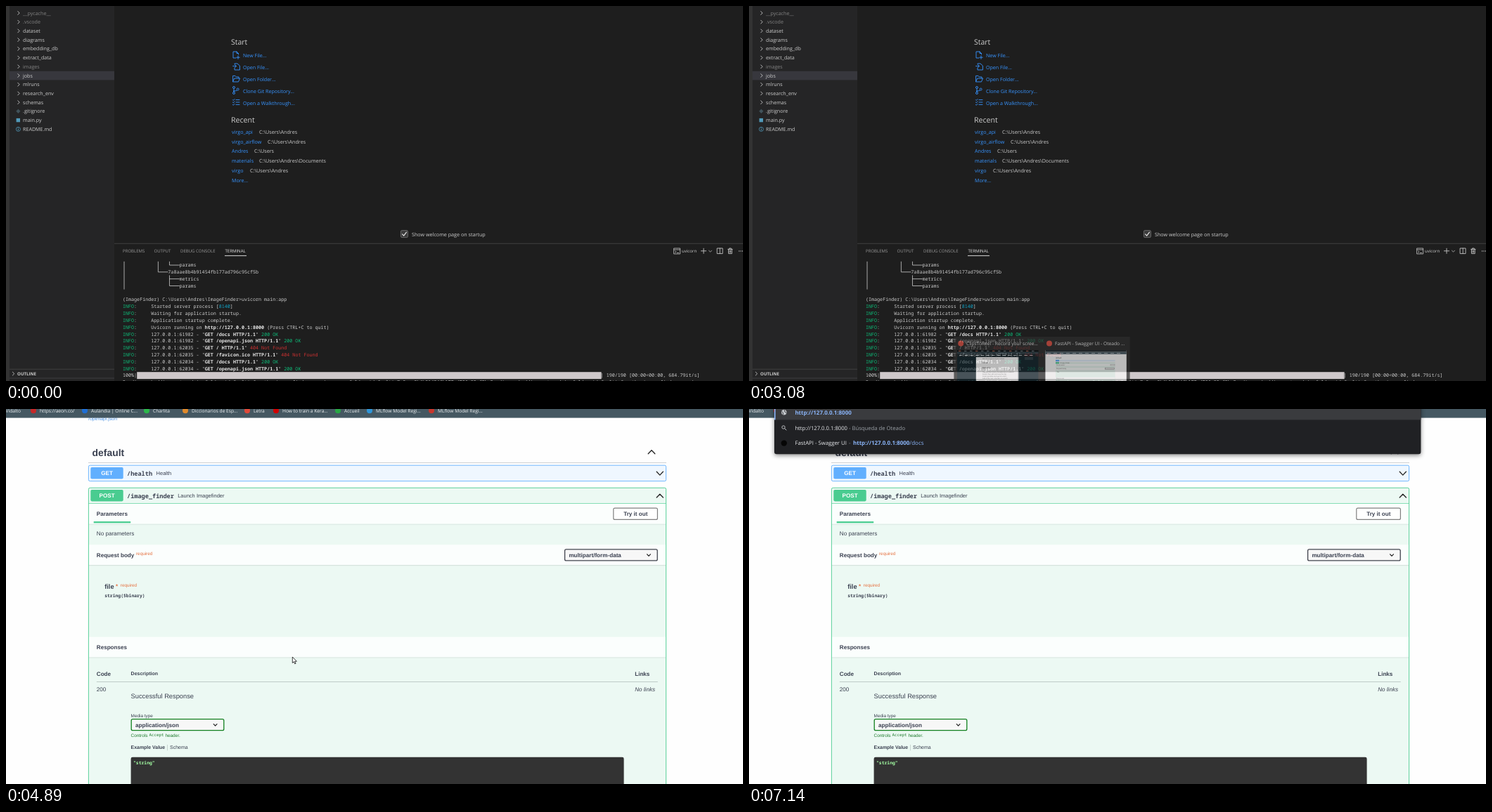
Animation of 1048 by 534 pixels, one loop 8 s. Source, as an HTML page:

```html
<!DOCTYPE html>
<html lang="en">
<head>
<meta charset="utf-8">
<title>API docs session</title>
<style>
html, body { margin: 0; width: 100%; height: 100%; overflow: hidden; background: #1e1e1e; }
svg { display: block; width: 100%; height: 100%; }
text { white-space: pre; text-rendering: geometricPrecision; }
.ui { font-family: "Open Sans", "Noto Sans", sans-serif; }
.sans { font-family: "Liberation Sans", Arial, sans-serif; }
.mono { font-family: "Noto Sans Mono", "DejaVu Sans Mono", monospace; }
.b { font-weight: 700; }
.i { font-style: italic; }
.line { fill: none; stroke-linecap: round; stroke-linejoin: round; }
#omni { filter: drop-shadow(0 2px 3px rgba(0, 0, 0, .45)); }
</style>
</head>
<body>
<svg id="stage" viewBox="0 0 1048 534">
  <g id="editor"></g>
  <g id="page"></g>
  <g id="omni"></g>
  <g id="popup"></g>
  <g id="beam"><path class="line" stroke="#e4e4e4" stroke-width=".9" d="M-2.4-4.6H-.7Q0-4.6 0-4Q0-4.6 .7-4.6H2.4M0-4V4M-2.4 4.6H-.7Q0 4.6 0 4Q0 4.6 .7 4.6H2.4"/></g>
  <g id="arrow"><path fill="#fff" stroke="#111" stroke-width=".8" d="M.4 .3V8.9L2.4 7.1L3.8 10.2L5.2 9.6L3.8 6.6H6.5Z"/></g>
</svg>
<script>
const LOOP = 8000;
const $ = id => document.getElementById(id);
const esc = s => s.replace(/&/g, '&amp;').replace(/</g, '&lt;').replace(/>/g, '&gt;');

// y is the middle of the capitals
const text = (x, y, s, size, fill, cls = 'ui', more = '') =>
  `<text x="${x}" y="${(y + size * .35).toFixed(2)}" font-size="${size}" fill="${fill}" class="${cls}" ${more}>${esc(s)}</text>`;
const rich = (x, y, parts, size, cls) =>
  `<text x="${x}" y="${(y + size * .35).toFixed(2)}" font-size="${size}" class="${cls}">` +
  parts.map(([s, fill, c = '']) => `<tspan fill="${fill}" class="${c}">${esc(s)}</tspan>`).join('') + '</text>';
const rect = (x, y, w, h, fill, more = '') =>
  `<rect x="${x}" y="${y}" width="${w}" height="${h}" fill="${fill}" ${more}/>`;
const dot = (x, y, r, fill) => `<circle cx="${x}" cy="${y}" r="${r}" fill="${fill}"/>`;
const line = (d, stroke, w = 1) => `<path class="line" d="${d}" stroke="${stroke}" stroke-width="${w}"/>`;
const chevron = (x, y, w, h, color, sw = 1.2) => line(`M${x - w} ${y - h}L${x} ${y + h}L${x + w} ${y - h}`, color, sw);

function drawEditor() {
  const UI = 7.15, fg = '#cccccc', dim = '#838383', link = '#3794ff';
  let s = rect(0, 0, 1048, 534, '#1e1e1e') + rect(0, 0, 5, 534, '#333333') + rect(5, 0, 149, 534, '#252526');

  // file tree
  s += rect(5, 92.8, 149, 12.6, '#37373d');
  '__pycache__ .vscode dataset diagrams embedding_db extract_data images jobs mlruns research_env schemas .gitignore main.py README.md'
    .split(' ').forEach((name, i) => {
      const y = 10 + i * 12.72;
      s += text(24, y, name, UI, [0, 1, 6].includes(i) ? dim : fg);
      if (i < 11) s += line(`M16.8 ${y - 2.4}L19.2 ${y}L16.8 ${y + 2.4}`, '#c5c5c5', .9);
    });
  s += rect(15.2, 147.6, 4.4, 4.4, '#41535b', 'transform="rotate(45 17.4 149.8)"');
  s += rect(14.6, 159.9, 5.4, 5.4, '#519aba');
  s += `<circle cx="17.4" cy="175.4" r="3" fill="none" stroke="#519aba" stroke-width=".8"/>` + line('M17.4 175.1V176.8M17.4 173.6V173.7', '#519aba', .9);
  s += rect(5, 516.8, 149, .8, '#454546') + rect(5, 529.6, 149, .8, '#454546');
  s += line('M9.4 521.2L11.8 523.6L9.4 526', '#c5c5c5', .9) + text(16, 523.5, 'OUTLINE', 6.15, fg, 'ui b');

  // welcome page
  s += text(320, 51, 'Start', 10.5, fg) + text(320, 162, 'Recent', 10.6, fg);
  ['New File...', 'Open File...', 'Open Folder...', 'Clone Git Repository...', 'Open a Walkthrough...']
    .forEach((name, i) => { s += text(337, 70.9 + i * 16.8, name, 7.1, link); });
  s += line('M327 74H323V65H328L330.5 67.5V69M328 65V67.5H330.5M330 71V75.4M327.8 73.2H332.2', link, .9);
  s += line('M325 83V82H329L332.4 85V91H325V88M322.6 85.6H327.4M325.6 83.6L327.4 85.6L325.6 87.6', link, .9);
  s += line('M322.6 107.6V99.4H326L327.4 101H331V103M322.6 107.6L324.8 103H332.6L330.6 107.6Z', link, .9);
  s += line('M324 118V122M324 120.5Q325 121.8 328 120.5M324 121V122.6', link, .9) +
    [[324, 116], [329.6, 118.6], [324, 124]].map(([x, y]) => `<circle cx="${x}" cy="${y}" r="1.5" fill="none" stroke="${link}" stroke-width=".9"/>`).join('');
  [133.6, 137, 140.4].forEach(y => { s += line(`M322.4 ${y}L323.3 ${y + .9}L325 ${y - 1}M327 ${y}H332`, link, .9); });
  [['virgo_api', 360, '\\Andres'], ['virgo_airflow', 372, '\\Andres'], ['Andres', 353, ''],
   ['materials', 360, '\\Andres\\Documents'], ['virgo', 347, '\\Andres'], ['More...']]
    .forEach(([name, x, tail], i) => {
      const y = 179.2 + i * 13.88;
      s += text(321, y, name, UI, link);
      if (x) s += text(x, y, 'C:\\Users' + tail, UI, fg);
    });
  s += rect(561.4, 319.6, 10, 10, '#3c3c3c', 'rx="1.5" stroke="#757575" stroke-width=".8"') +
    line('M563.6 324.9L565.6 327.1L569.4 322.2', '#f0f0f0', 1.1) +
    text(577, 325, 'Show welcome page on startup', 7.18, fg);

  // panel header
  s += rect(154, 337.8, 894, .9, '#434344');
  [['PROBLEMS', 166], ['OUTPUT', 210.5], ['DEBUG CONSOLE', 248], ['TERMINAL', 311.5]]
    .forEach(([name, x], i) => { s += text(x, 349, name, 6.05, i == 3 ? '#e7e7e7' : '#999999'); });
  s += rect(311, 355.2, 31, .9, '#e7e7e7');
  s += line('M950 345H958.6V353H950ZM950 347H958.6M951.6 349L953 350.2L951.6 351.4M954.4 351.4H956.6', '#c5c5c5', .8);
  s += text(961, 349, 'uvicorn', 6.1, fg);
  s += line('M988.4 348.8H995.6M992 345.2V352.4', '#c5c5c5', .9) + chevron(1001.5, 349.2, 2, 1, '#c5c5c5', .8);
  s += line('M1011.5 345H1019V352.6H1011.5ZM1015.2 345V352.6', '#c5c5c5', .9);
  s += line('M1026.6 346.4H1033M1028.4 346V345H1031.2V346M1027.4 346.6V352.6H1032.2V346.6M1029 348V351M1030.6 348V351', '#c5c5c5', .9);
  [1042.5, 1045, 1047.5].forEach(x => { s += dot(x, 349, .7, '#c5c5c5'); });

  // terminal
  const M = 6.715, X = 166, cw = M * .6, rowY = n => 369 + n * 9.82, col = n => X + n * cw;
  const mono = (n, parts) => { s += rich(X, rowY(n), parts, M, 'mono'); };
  const green = '#0dbc79', red = '#cd3131', white = '#e5e5e5';
  mono(0, [[' '.repeat(20) + 'params', fg]]);
  mono(1, [[' '.repeat(16) + '7a8aae8b4b91454fb177ad796c95cf5b', fg]]);
  mono(2, [[' '.repeat(20) + 'metrics', fg]]);
  mono(3, [[' '.repeat(20) + 'params', fg]]);
  const a = col(.5), b = col(12.5), c = col(16.5), end = col(15.9), end2 = col(19.9);
  s += line(`M${a} 364.2V403.2M${b} 364.2V378.8H${end}M${c} 364.2V369H${end2}M${c} 383.8V398.5H${end2}M${c} 388.6H${end2}`, fg, .8);
  mono(5, [['(ImageFinder) C:\\Users\\Andres\\ImageFinder>uvicorn main:app', fg]]);
  const info = (n, ...rest) => mono(n, [['INFO', green], [':     ', fg], ...rest]);
  info(6, ['Started server process [', fg], ['8140', '#11a8cd'], [']', fg]);
  info(7, ['Waiting for application startup.', fg]);
  info(8, ['Application startup complete.', fg]);
  info(9, ['Uvicorn running on ', fg], ['http://127.0.0.1:8000', white, 'b'], [' (Press CTRL+C to quit)', fg]);
  [[61982, '/docs'], [61982, '/openapi.json'], [62035, '/'], [62035, '/favicon.ico'], [62034, '/docs'], [62034, '/openapi.json']]
    .forEach(([port, path], i) => {
      const lost = i == 2 || i == 3;
      info(10 + i, [`127.0.0.1:${port} - "`, fg], [`GET ${path} HTTP/1.1`, white, 'b'], ['" ', fg],
        [lost ? '404 Not Found' : '200 OK', lost ? red : green]);
    });
  mono(16, [['100%|' + ' '.repeat(164) + '| 190/190 [00:00<00:00, 684.79it/s]', fg]]);
  s += rect(186.2, 521.2, 660.4, 9.9, '#cec8ca');
  mono(17, [["Reading embeddings stored in folder 'default' for the image finder service, run folder 'default' 7a8aae8b4b91454fb177ad796c95cf5b ".repeat(2).slice(0, 205), fg]]);
  $('editor').innerHTML = s;
}

function drawPage() {
  const ink = '#3b4151', F = 8.1, green = '#49cc90', mint = '#ecf9f3', band = '#fbfefd', need = '#e5703f';
  const sans = (x, y, str, size = F, cls = '', fill = ink, more = '') => text(x, y, str, size, fill, 'sans ' + cls, more);
  const mono = (x, y, str, size, fill = ink) => text(x, y, str, size, fill, 'mono b');
  let s = rect(0, 0, 1048, 534, '#fefefe');
  s += sans(117, 14, '/openapi.json', 6.9, '', '#4990e2');

  // bookmarks
  s += rect(0, 0, 1048, 12.6, '#455862');
  [['Vidalto', -.5], ['https://aeon.co/', 48, '#c62828'], ['Aulandia | Online C...', 121, '#1f6fd6'], ['Charlita', 209, '#2bb74a'],
   ['Diccionarios de Esp...', 264, '#e08a2c'], ['Letra', 352, '#e04a3a'], ['How to train a Kera...', 393, '#d00000'],
   ['Accueil', 481, '#28a745'], ['MLflow Model Regi...', 526, '#2f95d8'], ['MLflow Model Regi...', 614, '#c8372d']]
    .forEach(([name, x, color]) => {
      s += text(x, 2.2, name, 6.65, '#f1f3f4');
      if (color) s += dot(x - 9, 2.2, 4, color);
    });

  s += sans(122.6, 61.8, 'default', 13.9, 'b') + chevron(918, 61.2, 4.8, -2.5, '#222', 1.3);
  s += rect(117, 76, 822, .8, '#c4c6ca');

  const head = (y, color, verb, path, note, x) =>
    rect(120.3, y - 8.2, 46.4, 16.4, color, 'rx="1.8"') +
    sans(143.6, y, verb, F, 'b', '#fff', 'text-anchor="middle"') +
    mono(172, y + .3, path, 8.58) + sans(x, y, note, 7.5);
  s += rect(117.4, 80.2, 821.2, 22.5, '#eff7ff', 'rx="2" stroke="#61affe" stroke-width=".9"');
  s += head(91.3, '#61affe', 'GET', '/health', 'Health', 213.6) + chevron(929.8, 91.7, 4.6, 2.4, '#222', 1.3);
  s += rect(117.4, 112.3, 821.2, 440, mint, `rx="2" stroke="${green}" stroke-width=".9"`);
  s += head(123.2, green, 'POST', '/image_finder', 'Launch Imagefinder', 244.2) + chevron(929.8, 123.6, 4.6, -2.4, '#222', 1.3);
  s += rect(117.4, 134, 821.2, .8, green);

  [[134.8, 29], [193.2, 29], [324.6, 29]].forEach(([y, h]) => {
    s += rect(118, y, 820, h, band) + rect(118, y + h, 820, .8, '#d3dfd9') + rect(118, y + h + .8, 820, .6, '#e3f0ea');
  });
  s += sans(128.8, 149.5, 'Parameters', F, 'b') + rect(124.7, 160.1, 52.5, 2.3, green);
  s += rect(863.8, 141.2, 62.6, 16.2, '#fff', 'rx="2" stroke="#808080" stroke-width="1.2"') +
    sans(895.3, 149.5, 'Try it out', F, 'b', ink, 'text-anchor="middle"');
  s += sans(128.8, 177.2, 'No parameters');
  s += sans(128.8, 208, 'Request body', F, 'b') + sans(185, 205.6, 'required', 6.35, '', need);
  const select = (x, y, str, color) =>
    rect(x + .6, y - 8, 131.6, 16, '#f7f7f7', `rx="2" stroke="${color}" stroke-width="1.3"`) +
    sans(x + 6.4, y, str, 8.15, 'b') + chevron(x + 120, y + .2, 2.4, 1.3, '#222', 1.2);
  s += select(794, 207.9, 'multipart/form-data', '#41444e');

  s += sans(140.2, 253.1, 'file', 9.3, 'b') + sans(156, 252.4, '*', 8, 'b', need) + sans(162.8, 251, 'required', 6.35, '', need);
  s += mono(140.2, 265.8, 'string($binary)', 6.38);
  s += sans(128.8, 339.2, 'Responses', F, 'b');
  s += sans(128.8, 377, 'Code', F, 'b') + sans(177.6, 376.9, 'Description', 7, 'b') + sans(894.2, 377, 'Links', F, 'b');
  s += rect(128.8, 388, 798, .8, '#b4c1bd');
  s += sans(128.8, 399.5, '200') + sans(894.2, 399.5, 'No links', F, 'i') + sans(177.6, 409, 'Successful Response', 9.3);
  s += sans(177.6, 436.6, 'Media type', 6.4) + select(177.6, 449.7, 'application/json', '#12801f');
  s += sans(177.6, 464.3, 'Controls', 6.4, '', '#1d7a2c') + text(203.5, 464.3, 'Accept', 5.87, '#1d7a2c', 'mono') + sans(226.4, 464.3, 'header.', 6.4, '', '#1d7a2c');
  s += sans(177.6, 482, 'Example Value', 6.95, 'b') + rect(229.2, 478, .7, 8.4, '#b9c6c1') + sans(233, 482, 'Schema', 7);
  s += rect(177.6, 495.8, 701, 50, '#333333', 'rx="2.3"') + mono(181, 503.8, '"string"', 6.38, '#a2fca2');
  $('page').innerHTML = s;
}

function drawOmni() {
  const blue = '#8ab4f8', grey = '#9aa0a6', url = 'http://127.0.0.1:8000';
  let s = `<path d="M36-6H955.4V61Q955.4 64.2 952.2 64.2H39.2Q36 64.2 36 61Z" fill="#202124"/>`;
  s += rect(36, -6, 919.4, 21.4, '#3a3b3e') + rect(36, -6, 1.6, 21.4, blue);
  s += dot(49.8, 4.8, 3.7, '#c4c7cb') + line('M47 3.6Q49 5 48.6 7.4M50.4 1.8Q50 4 52.6 5.4', '#3a3b3e', 1);
  s += text(65.4, 4.9, url, 7.95, blue, 'ui b');
  s += `<circle cx="49" cy="26" r="2.2" fill="none" stroke="#c4c7cb" stroke-width=".9"/>` + line('M50.7 27.7L53 30', '#c4c7cb', 1);
  s += text(65.4, 27, url, 7.68, '#e8eaed') + text(142, 27, '- Búsqueda de Oteado', 7.68, grey);
  s += '<g id="favicon">' + dot(49.8, 48.6, 4.2, '#060606') + '</g>';
  s += text(65.4, 48.7, 'FastAPI - Swagger UI', 7.75, '#e8eaed') + text(142, 48.7, '-', 7.7, grey);
  s += rich(148, 48.7, [[url, blue, 'b'], ['/docs', blue]], 7.95, 'ui');
  $('omni').innerHTML = s;
}

function drawPopup() {
  const tab = (x, w, id) => `<rect id="${id}" x="${x}" y="469" width="${w}" height="70"/>`;
  const tiny = (x, y, str, size = 2.2, fill = '#555') => text(x, y, str, size, fill);
  let s = tab(291.4, 125.8, 'tabL') + tab(417, 124.6, 'tabR');
  [301.2, 427].forEach(x => { s += dot(x, 478.6, 4, '#dd5144'); });
  s += text(309, 478.6, 'ClipsToReel - Record your scree...', 6.65, '#f2f2f2');
  s += text(435, 478.6, '', 6.7, '#f2f2f2', 'ui', 'id="title"');
  s += `<g id="close">${line('M529 475.4L535.2 481.6M535.2 475.4L529 481.6', '#f2f2f2', .9)}</g>`;

  // left preview
  s += rect(296, 488, 115.4, 50, '#10232a') + rect(296, 488, 115.4, 2.6, '#0c1114') + rect(296, 490.6, 115.4, 3, '#33434b') + rect(296, 493.6, 115.4, 4, '#1a2428');
  for (let i = 0; i < 14; i++) s += rect(298 + i * 8, 488.8, 3.4, 1, i % 3 ? '#7a868c' : '#c46a52') + rect(299 + i * 7.7, 495, 4.4, 1, '#aab4b8');
  s += rect(322.8, 498, 60.4, 40, '#fbfbfb') + rect(382, 498, 1.2, 40, '#c9cdcf') + rect(392, 498, 12, 4, '#2a3b42');
  s += tiny(332, 500.6, 'Record a region of your screen') + tiny(332, 505.8, 'Editor', 2.8, '#222') + tiny(332, 513.2, 'Features', 2.8, '#222');
  ['Capture the screen, the webcam or a sketch', 'board, then edit and save the clip.', 'Small, portable and quick to start.', 'Add a title, text, a border or a mark.']
    .forEach((str, i) => { s += tiny(332, 519 + i * 3.2, str); });

  // right preview
  s += rect(421.4, 488, 115.4, 50, '#fdfdfd') + rect(421.4, 488, 115.4, 2.6, '#20292e') + rect(421.4, 490.6, 115.4, 3.2, '#455862');
  for (let i = 0; i < 12; i++) s += rect(424 + i * 9, 492, 5, .8, '#b9c4c9');
  s += tiny(436, 498.6, 'default', 2.6, '#333') + rect(436, 501.8, 84.6, 2.4, '#e2effd') + rect(436, 501.8, 5, 2.4, '#61affe');
  s += rect(436, 505.2, 84.6, 33, mintBg) + rect(436, 505.2, 5, 2.2, '#49cc90') + rect(436.2, 507.8, 84.2, 2.8, '#fcfefd') + rect(436.2, 513.2, 84.2, 3, '#fcfefd') + rect(436.2, 526.8, 84.2, 3, '#fcfefd');
  s += tiny(442, 506.3, '/image_finder') + tiny(437, 509.3, 'Parameters') + tiny(437, 514.7, 'Request body') + tiny(438, 519.5, 'file') + tiny(437, 528.3, 'Responses') + tiny(437, 532.6, 'Code');
  s += rect(506.4, 513.4, 13.4, 2.2, '#f0f0f0', 'stroke="#666" stroke-width=".4"') + rect(514, 508.2, 6, 1.8, '#fff', 'stroke="#999" stroke-width=".4"');
  $('popup').innerHTML = s;
}
const mintBg = '#e6f6ee';

// start, end, steps, pointer, path; each ends hidden at `off` when given
const moves = [
  { t0: 180, t1: 450, n: 5, who: 'beam', pts: [[992, 529], [690, 470], [504, 440]] },
  { t0: 730, t1: 870, n: 3, who: 'beam', pts: [[504, 439.5], [504, 437.5]] },
  { t0: 1400, t1: 1470, n: 2, who: 'beam', pts: [[501.8, 438], [503, 438]] },
  { t0: 1800, t1: 1940, n: 3, who: 'beam', off: 2010, pts: [[496, 445], [461, 484]] },
  { t0: 3620, t1: 3690, n: 2, who: 'arrow', pts: [[483, 525], [481, 512.5]] },
  { t0: 4820, t1: 5600, n: 12, who: 'arrow', pts: [[468, 480], [300, 130], [238, 2], [620, 40], [929, 88.5]] },
  { t0: 5670, t1: 5810, n: 3, who: 'arrow', off: 5880, pts: [[790, 66], [255, 2]] }
];

function pointer(t) {
  const m = moves.filter(v => t >= v.t0).pop();
  if (!m || t >= m.off) return null;
  const gaps = m.n - 1;
  const u = Math.min(gaps, Math.floor((t - m.t0) / (m.t1 - m.t0) * gaps + .1)) / gaps;
  const p = u * (m.pts.length - 1), i = Math.min(m.pts.length - 2, Math.floor(p)), f = p - i;
  const [x, y] = m.pts[i].map((v, k) => v + (m.pts[i + 1][k] - v) * f);
  return { who: m.who, x, y };
}

const show = (id, on) => $(id).setAttribute('display', on ? 'inline' : 'none');

function popupAlpha(t) {
  if (t < 3080 || t >= 4420) return 0;
  if (t < 3150) return .7;
  if (t < 3220) return .88;
  return t < 4290 ? 1 : .5;
}

function render(t) {
  const onPage = t >= 3960, hover = t >= 3620, alpha = popupAlpha(t);
  show('editor', !onPage);
  show('page', onPage);
  show('omni', t >= 7070);
  show('favicon', t >= 7140);

  show('popup', alpha > 0);
  $('popup').setAttribute('opacity', alpha);
  $('popup').setAttribute('transform', `translate(0 ${t < 3150 ? 2 : t < 3220 ? 1 : 0})`);
  $('tabL').setAttribute('fill', onPage ? '#484848' : '#2d2d2d');
  $('tabR').setAttribute('fill', onPage ? '#5f5f5f' : hover ? '#4a4a4a' : '#2d2d2d');
  $('title').textContent = 'FastAPI - Swagger UI - ' + (hover ? 'G...' : 'Oteado ...');
  show('close', hover);

  const p = pointer(t);
  for (const id of ['beam', 'arrow']) {
    const on = !!p && p.who == id;
    show(id, on);
    if (on) $(id).setAttribute('transform', `translate(${p.x.toFixed(1)} ${p.y.toFixed(1)})`);
  }
}

drawEditor();
drawPage();
drawOmni();
drawPopup();
const start = performance.now();
function tick() {
  render((performance.now() - start) % LOOP);
  requestAnimationFrame(tick);
}
render(0);
tick();
</script>
</body>
</html>
```
